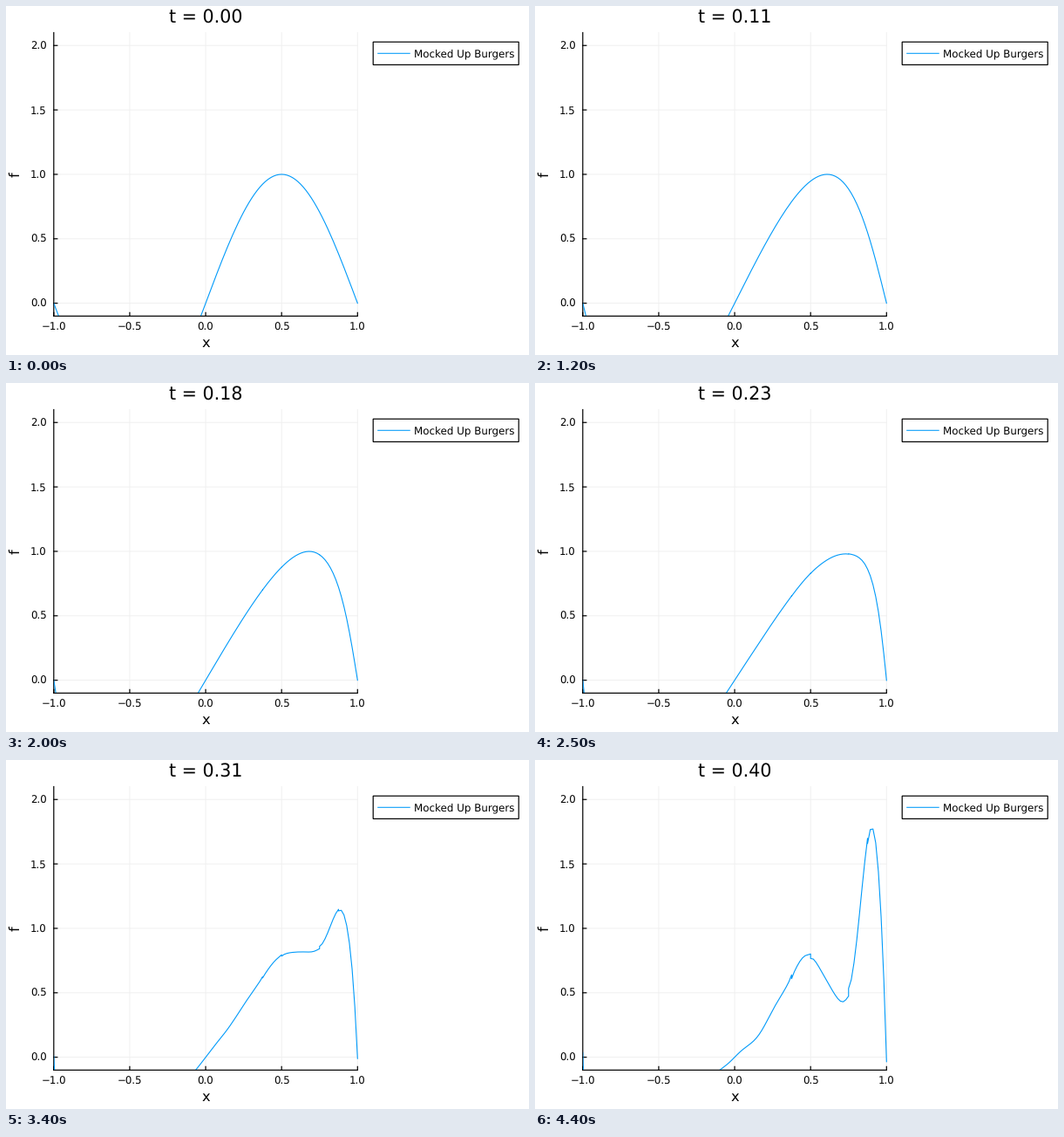
Write a matplotlib script that moves like this. It is 600 px wide and 400 px high and loops after 4.5 s.

```python
import numpy as np
import matplotlib.pyplot as plt
from matplotlib.animation import FuncAnimation
from matplotlib.patches import Rectangle

plt.rcParams.update({"font.family": "DejaVu Sans", "text.hinting": "none"})

W, H, DPI = 600, 400, 100
FRAMES, INTERVAL = 45, 100
T_END = 0.4
LEFT, RIGHT, TOP, BOTTOM = 54.8, 403.3, 30.5, 355.4
BLUE, GRID = "#009AFA", "#F0F0F0"
PT = 72 / DPI

fig = plt.figure(figsize=(W / DPI, H / DPI), dpi=DPI, facecolor="white")
ax = fig.add_axes([0, 0, 1, 1])
ax.set_xlim(0, W)
ax.set_ylim(H, 0)
ax.axis("off")


def px(x):
    return LEFT + (x + 1) / 2 * (RIGHT - LEFT)


def py(f):
    return BOTTOM - (f + 0.1) / 2.2 * (BOTTOM - TOP)


def line(xs, ys, color="black", width=1.2, z=2):
    return ax.plot(xs, ys, color=color, lw=width * PT, zorder=z,
                   snap=False)[0]


def label(x, y, s, size, ha="center"):
    return ax.text(x, y, s, fontsize=size * PT, ha=ha, va="baseline")


# Right half of the domain: 8 elements with 8 evenly spaced points each
ELEMS, NODES = 8, 8
X = ((np.arange(ELEMS)[:, None] + np.linspace(0, 1, NODES)) / ELEMS).ravel()
CENTER = np.repeat((np.arange(ELEMS) + 0.5) / ELEMS, NODES)

ONSET, GROWTH, T_STEEP = 0.17, 2.4, 0.264
# Final ripple at x = 0.1 ... 0.9, and the jumps at element edges
RIPPLE = [-.07, -.087, -.036, .028, -.008, -.30, -.55, -.125, .93]
JUMPS = {3: -.03, 4: -.035, 6: .06, 7: -.04, 8: .07}


def steepened(t):
    """Inviscid Burgers solution along characteristics."""
    s = np.linspace(0, 1, 2001)
    u = np.sin(np.pi * s)
    return np.interp(X, s + t * u, u)


def sine_fit(values):
    """Odd, smooth curve through evenly spaced values."""
    k = np.arange(1, len(values) + 1)
    knots = k / (len(values) + 1)
    coef = np.linalg.solve(np.sin(np.pi * np.outer(knots, k)), values)
    return np.sin(np.pi * np.outer(X, k)) @ coef


def edge_jumps():
    out = np.zeros_like(X)
    for edge, jump in JUMPS.items():
        x = edge / ELEMS
        out += jump / 2 * np.sign(CENTER - x) * np.exp(-abs(X - x) / 0.01)
    return out


ripple = sine_fit(RIPPLE) + edge_jumps()


def mirror(a):
    return np.concatenate([-a[::-1], a])


def profile(t):
    amp = (max(t - ONSET, 0) / (T_END - ONSET)) ** GROWTH
    return mirror(steepened(min(t, T_STEEP)) + amp * ripple)


# Grid, ticks and axes
for v in np.linspace(-1, 1, 5):
    x = px(v)
    line([x, x], [TOP, BOTTOM], GRID, 1, 1)
    line([x, x], [BOTTOM, BOTTOM - 4])
    label(x, 371.8, f"{v:.1f}".replace("-", "\u2212"), 11.8)
for v in np.linspace(0, 2, 5):
    y = py(v)
    line([LEFT, RIGHT], [y, y], GRID, 1, 1)
    line([LEFT, LEFT + 4], [y, y])
    label(46.8, y + 4.5, f"{v:.1f}", 11.8, "right")
line([LEFT, RIGHT], [BOTTOM, BOTTOM])
line([LEFT, LEFT], [TOP, BOTTOM])
label(px(0), 391.4, "x", 16.2)
ax.text(19.3, 193, "f", fontsize=16.2 * PT, rotation=90,
        ha="right", va="center")

# Legend
ax.add_patch(Rectangle((421.2, 41.2), 167, 26.2, fc="white", ec="black",
                       lw=1.2 * PT, snap=False))
line([426.7, 463.2], [54.3, 54.3], BLUE, 1.05, 3)
label(467.7, 58.5, "Mocked Up Burgers", 11.85, "left")

title = label(px(0), 18.5, "", 20.6)
curve = line([], [], BLUE, 1.1, 3)
curve.set_clip_path(Rectangle((LEFT, TOP), RIGHT - LEFT + 1, BOTTOM - TOP,
                              transform=ax.transData))
xs = px(mirror(X))


def update(i):
    t = T_END * i / (FRAMES - 1)
    title.set_text(f"t = {t:.2f}")
    curve.set_data(xs, py(profile(t)))
    return title, curve


anim = FuncAnimation(fig, update, frames=FRAMES, interval=INTERVAL,
                     repeat=True, repeat_delay=0, blit=False)
plt.show()
```
